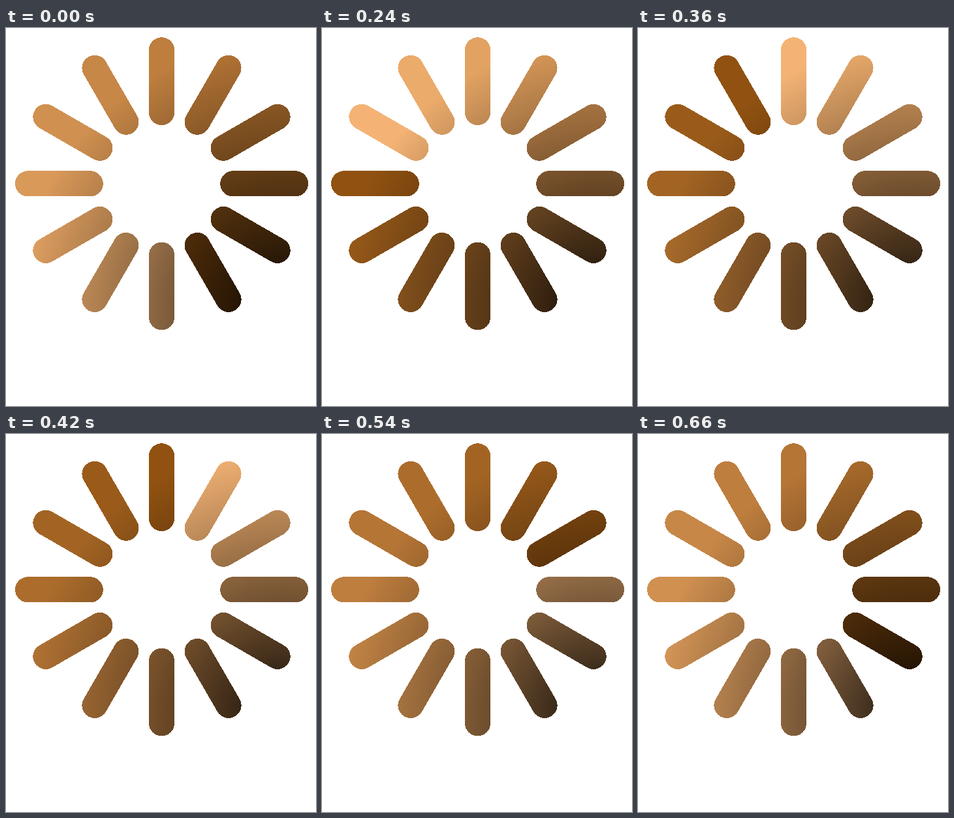
Write an HTML page that moves like this. It is 475 px wide and 580 px high and loops after 0.72 s.

```html
<!DOCTYPE html>
<html lang="en">
<head>
<meta charset="utf-8">
<title>Spinner</title>
<style>
  html, body { margin: 0; width: 100%; height: 100%; overflow: hidden; background: #fff; }
  svg { display: block; width: 475px; height: 580px; }
  path { fill: none; stroke-width: 39.2; stroke-linecap: round; shape-rendering: crispEdges; }
</style>
</head>
<body>
<svg viewBox="0 0 475 580" xmlns="http://www.w3.org/2000/svg">
  <defs>
    <radialGradient id="shade" gradientUnits="userSpaceOnUse" cx="430" cy="430" r="412">
      <stop offset="0" stop-color="#000" stop-opacity=".9"/>
      <stop offset=".42" stop-color="#000" stop-opacity=".5"/>
      <stop offset="1" stop-color="#000" stop-opacity="0"/>
    </radialGradient>
  </defs>
  <g id="bars"></g>
  <path id="cover" stroke="url(#shade)"/>
</svg>
<script>
const COUNT = 12, STEP = 60, FIRST = 5;
const CX = 238.5, CY = 238.85, INNER = 109.3, OUTER = 205;
const group = document.getElementById('bars');

function point(i, radius) {
  const a = i * 2 * Math.PI / COUNT;
  const x = CX + radius * Math.sin(a);
  const y = CY - radius * Math.cos(a);
  return x.toFixed(2) + ' ' + y.toFixed(2);
}

const lines = Array.from({ length: COUNT }, (_, i) =>
  `M${point(i, INNER)}L${point(i, OUTER)}`);

const bars = lines.map(d => {
  const bar = document.createElementNS('http://www.w3.org/2000/svg', 'path');
  bar.setAttribute('d', d);
  return group.appendChild(bar);
});
document.getElementById('cover').setAttribute('d', lines.join(''));

// Each bar lightens by a fixed amount per step after the head passes it.
function tint(age) {
  return `rgb(${145 + 9 * age},${Math.round(82 + 8.85 * age)},${17 + 9 * age})`;
}

function draw(time) {
  const head = FIRST + Math.floor(time / STEP) % COUNT;
  bars.forEach((bar, i) =>
    bar.setAttribute('stroke', tint((head - i + COUNT) % COUNT)));
}

const start = performance.now();
function tick() {
  draw(performance.now() - start);
  requestAnimationFrame(tick);
}
draw(0);
requestAnimationFrame(tick);
</script>
</body>
</html>
```
